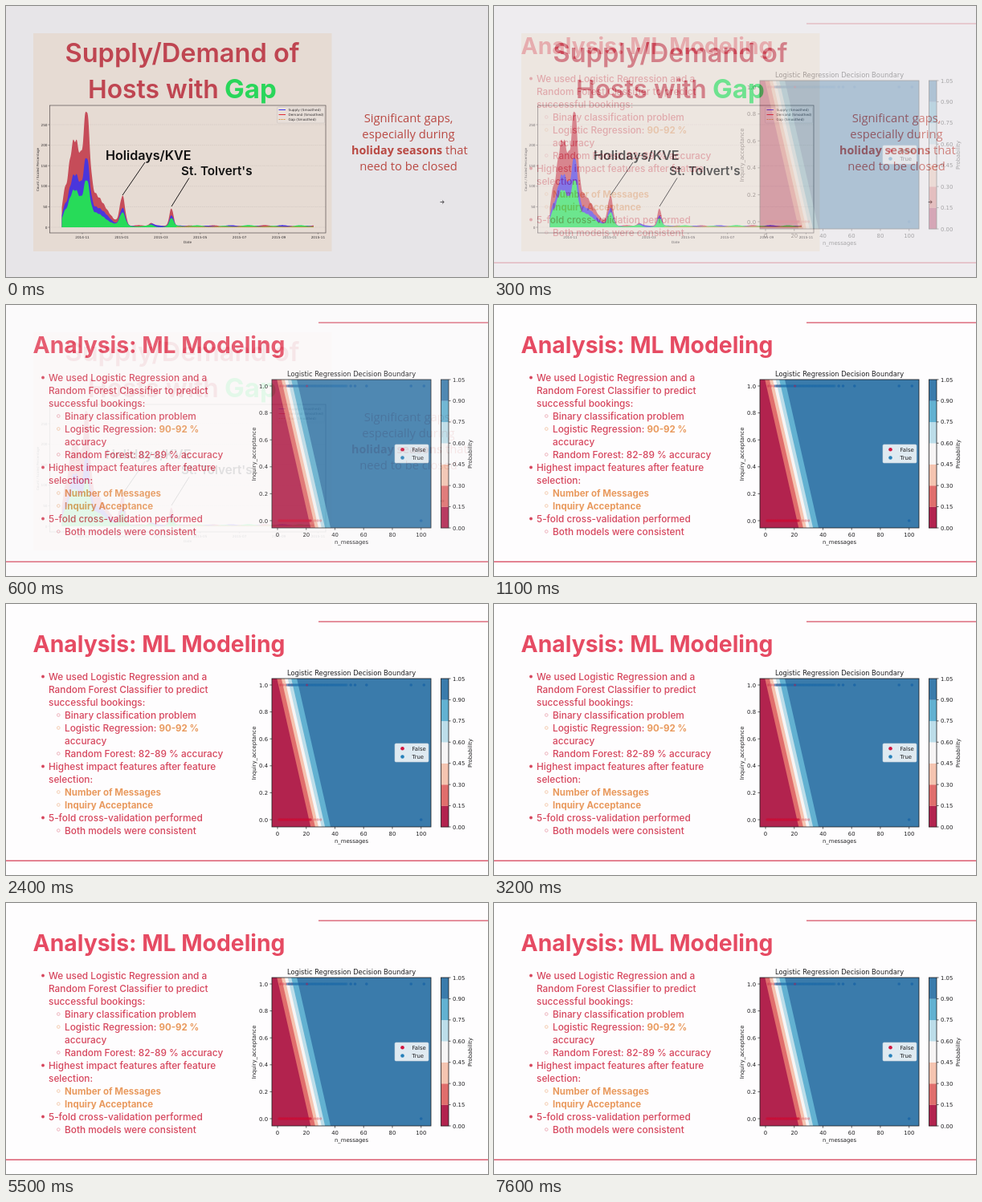
An HTML page with a canvas for the animation above (7700 ms loop, 600 by 338 pixels).

```html
<!DOCTYPE html>
<html lang="en">
<head>
<meta charset="utf-8">
<title>Slides</title>
<style>
  html, body { margin: 0; width: 100%; height: 100%; overflow: hidden; background: #fefdfe; }
  canvas { position: absolute; left: 0; top: 0; width: 600px; height: 338px; }
</style>
</head>
<body>
<canvas id="gap"></canvas>
<canvas id="model"></canvas>
<script>
const W = 600, H = 338, LOOP = 7700, STEP = 100, FADE = 780;
const UI = 'Inter, sans-serif', PLOT = '"DejaVu Sans", sans-serif', NOTE = '"Open Sans", sans-serif';
let c;

function open(id) {
  const el = document.getElementById(id), k = Math.max(1, window.devicePixelRatio || 1);
  el.width = W * k;
  el.height = H * k;
  c = el.getContext('2d');
  c.scale(k, k);
  return el;
}

function rect(x, y, w, h, fill) {
  c.fillStyle = fill;
  c.fillRect(x, y, w, h);
}

function frame(x, y, w, h, color, width) {
  c.strokeStyle = color;
  c.lineWidth = width;
  c.strokeRect(x, y, w, h);
}

function line(x1, y1, x2, y2, color, width = 1, dash = []) {
  c.strokeStyle = color;
  c.lineWidth = width;
  c.setLineDash(dash);
  c.beginPath();
  c.moveTo(x1, y1);
  c.lineTo(x2, y2);
  c.stroke();
  c.setLineDash([]);
}

function text(str, x, y, font, color, align = 'left') {
  c.font = font;
  c.fillStyle = color;
  c.textAlign = align;
  c.fillText(str, x, y);
  return c.measureText(str).width;
}

function upText(str, x, y, font, color) {
  c.save();
  c.translate(x, y);
  c.rotate(-Math.PI / 2);
  text(str, 0, 0, font, color, 'center');
  c.restore();
}

function dot(x, y, r, fill) {
  c.fillStyle = fill;
  c.beginPath();
  c.arc(x, y, r, 0, 7);
  c.fill();
}

function ring(x, y, r, color) {
  c.strokeStyle = color;
  c.lineWidth = 0.7;
  c.beginPath();
  c.arc(x, y, r, 0, 7);
  c.stroke();
}

function box(x, y, w, h, r, fill, stroke) {
  c.beginPath();
  c.roundRect(x, y, w, h, r);
  c.fillStyle = fill;
  c.fill();
  c.strokeStyle = stroke;
  c.lineWidth = 0.6;
  c.stroke();
}

const BASE = 276;
const bump = (x, at, height, width) => height * Math.exp(-((x - at) ** 2) / (2 * width * width));

// Autumn surge, its long decay, then two holiday peaks.
function demand(x) {
  const h = bump(x, 72, 14, 2) + bump(x, 85, 100, 8) + bump(x, 100.5, 98, 3.6) + bump(x, 110, 40, 14) +
    bump(x, 145, 37, 3.3) + bump(x, 181, 4.5, 3) + bump(x, 206, 23, 2.6);
  return h * (1 + 0.03 * Math.sin(x * 1.3));
}

function area(share, phase, fill) {
  c.fillStyle = fill;
  c.beginPath();
  c.moveTo(69.5, BASE);
  for (let x = 69.5; x <= 383; x += 0.5) {
    const ripple = 1.4 + 0.8 * Math.sin(x * 0.2 + phase) + 0.5 * Math.sin(x * 0.083 + phase * 2);
    c.lineTo(x, BASE - share * demand(x) - ripple);
  }
  c.lineTo(383, BASE);
  c.fill();
}

function drawGapSlide() {
  const ink = '#332f31', small = '4.2px ' + PLOT, rose = '#bf4551';
  rect(0, 0, W, H, '#e7e5e8');
  rect(34, 34, 371.5, 272, '#e6dbd3');
  text('Supply/Demand of', 219.5, 70, '600 32.6px ' + UI, rose, 'center');
  text('Hosts with', 102, 115, '600 31.8px ' + UI, rose);
  text('Gap', 272, 115, '700 33px ' + UI, '#29d65a');

  for (let i = 0; i < 6; i++) {
    const y = BASE - i * 25.6;
    line(54, y, 398, y, '#c8beb9', 0.5, [1.5, 1]);
    line(52.5, y, 54, y, ink, 0.5);
    text(i * 50, 51.5, y + 1.6, small, ink, 'right');
  }
  for (let i = 0; i < 7; i++) {
    const x = 95 + i * 48.9, month = (10 + 2 * i) % 12 + 1;
    line(x, 283, x, 284.5, ink, 0.5);
    text(`${i ? 2015 : 2014}-${String(month).padStart(2, '0')}`, x, 289.5, small, ink, 'center');
  }
  text('Date', 226, 295.5, small, ink, 'center');
  upText('Count / Scaled Percentage', 41, 204, '4.1px ' + PLOT, ink);

  area(1, 0, '#c64c59');
  area(0.6, 2, '#4a36dc');
  area(0.41, 4, '#27db59');
  line(212, BASE - 0.4, 383, BASE - 0.4, '#d9953f', 0.8);
  frame(54.5, 124, 343.5, 159, '#574f4f', 0.7);

  box(337.5, 126, 59, 20, 1, '#e8dfd9', '#cbc3bf');
  [['Supply', '#3b35ee'], ['Demand', '#e02c36'], ['Gap', '#d99a4b']].forEach(([name, color], i) => {
    const y = 129.5 + i * 6;
    line(339.5, y, 348, y, color, 1, i === 2 ? [2, 1] : []);
    text(name + ' (Smoothed)', 351.5, y + 1.6, small, ink);
  });

  line(173, 195, 145, 236, '#1c191a');
  line(228, 214.5, 206, 250, '#1c191a');
  text('Holidays/KVE', 124, 192, '600 16.1px ' + UI, '#111');
  text("St. Tolvert's", 218, 211, '600 15.2px ' + UI, '#111');

  const note = '14.75px ' + NOTE, red = '#b94943';
  text('Significant gaps,', 501, 145, note, red, 'center');
  text('especially during', 501, 165, note, red, 'center');
  const w = text('holiday seasons', 430, 185, 'bold 14.3px ' + NOTE, red);
  text(' that', 430 + w, 185, note, red);
  text('need to be closed', 501, 204.5, note, red, 'center');

  line(540.5, 244.5, 545, 244.5, '#39363a', 0.8);
  for (const side of [-2, 2]) line(543, 244.5 + side, 545.3, 244.5, '#39363a', 0.8);
}

// Indent sets the level, asterisks mark bold.
const list = `
• We used Logistic Regression and a
  Random Forest Classifier to predict
  successful bookings:
  ◦ Binary classification problem
  ◦ Logistic Regression: *90-92 %
    accuracy
  ◦ Random Forest: 82-89 % accuracy
• Highest impact features after feature
  selection:
  ◦ *Number of Messages
  ◦ *Inquiry Acceptance
• 5-fold cross-validation performed
  ◦ Both models were consistent`.trim().split('\n');

function drawList() {
  const red = '#d6465d', orange = '#e99a5e';
  list.forEach((row, i) => {
    const y = 90.5 + i * 16, x = /^ {4}|◦/.test(row) ? 73 : 53;
    const [plain, bold] = row.replace(/^[ •◦]+/, '').split('*');
    if (row.includes('•')) dot(46, y, 1.9, red);
    if (row.includes('◦')) ring(65.3, y, 1.8, bold ? '#efb78d' : '#e6929f');
    const w = text(plain, x, y + 4, '500 11.85px ' + UI, red);
    if (bold) text(bold, x + w, y + 4, '700 11.5px ' + UI, orange);
  });
}

const bands = ['#b2234e', '#e06e6c', '#f5c4b0', '#f7f5f5', '#bcdde9', '#62b1d1', '#3a7bab'];

function drawBoundary() {
  const L = 331, T = 93, R = 529, B = 278, ink = '#1d1d1f', font = '6.85px ' + PLOT;
  const px = n => 338 + n * 1.787, py = v => 269 - v * 168;
  text('Logistic Regression Decision Boundary', 430, 89, '8.3px ' + PLOT, ink, 'center');

  c.save();
  c.beginPath();
  c.rect(L, T, R - L, B - T);
  c.clip();
  // Band edges are the contours of a logistic model at steps of 0.15.
  bands.forEach((color, i) => {
    const p = i * 0.15, x = i ? 348.2 + 6.3 * Math.log(p / (1 - p)) : 0;
    c.fillStyle = color;
    c.beginPath();
    c.moveTo(x, T);
    c.lineTo(R, T);
    c.lineTo(R, B);
    c.lineTo(x + 42 * (i > 0), B);
    c.fill();
  });
  for (let n = 1; n < 24; n++) dot(px(n), py(0), 1.8, 'rgba(205,12,52,.6)');
  for (let n = 26; n < 31; n += 2) dot(px(n), py(0), 1.7, 'rgba(225,90,100,.45)');
  for (let n = 2; n < 12; n += 2) dot(px(n), py(1), 1.7, 'rgba(200,40,75,.4)');
  for (let n = 7; n < 49; n++) dot(px(n), py(1), 1.8, 'rgba(24,103,168,.5)');
  for (const n of [51, 54, 62, 93, 102]) dot(px(n), py(1), 1.8, '#1f68a6');
  dot(px(20.5), py(1), 1.6, 'rgba(150,45,95,.65)');
  dot(px(100), py(0), 1.8, '#1f68a6');
  c.restore();

  frame(L, T, R - L, B - T, ink, 0.8);
  for (let i = 0; i < 6; i++) {
    const x = px(i * 20), y = py(i / 5);
    line(x, B, x, B + 2.6, ink, 0.7);
    line(L - 2.6, y, L, y, ink, 0.7);
    text(i * 20, x, 289, font, ink, 'center');
    text((i / 5).toFixed(1), 326, y + 2.5, font, ink, 'right');
  }
  text('n_messages', 430, 297.5, font, ink, 'center');
  upText('Inquiry_acceptance', 311, 186, font, ink);

  const h = (B - T) / bands.length;
  bands.forEach((color, i) => rect(541.5, B - (i + 1) * h, 9.5, h + 0.2, color));
  frame(541.5, T, 9.5, B - T, ink, 0.8);
  for (let i = 0; i <= bands.length; i++) {
    const y = B - i * h;
    line(551, y, 553.6, y, ink, 0.7);
    text((i * 0.15).toFixed(2), 556, y + 2.5, font, ink);
  }
  upText('Probability', 579.5, 186, font, ink);

  box(484, 174, 42, 23, 1.5, 'rgba(255,255,255,.84)', '#c7d2da');
  [['False', '#d3153f'], ['True', '#2680ba']].forEach(([name, color], i) => {
    const y = 180.3 + i * 10.2;
    dot(493.5, y, 2.3, color);
    text(name, 505.5, y + 2.5, font, ink);
  });
}

function drawModelSlide() {
  rect(0, 0, W, H, '#fefdfe');
  line(389, 22, W, 22, '#dc6d7c', 1.3);
  line(0, 320.3, W, 320.3, '#dc5c70', 1.5);
  text('Analysis: ML Modeling', 33.5, 60, '700 28.3px ' + UI, '#e64b63');
  drawList();
  drawBoundary();
}

open('gap');
drawGapSlide();
const model = open('model');
drawModelSlide();

const start = performance.now();
function tick() {
  const now = (performance.now() - start) % LOOP;
  const p = Math.min(1, Math.floor(now / STEP) * STEP / FADE);
  model.style.opacity = (1 - Math.cos(Math.PI * p)) / 2;
  requestAnimationFrame(tick);
}
model.style.opacity = 0;
tick();
</script>
</body>
</html>
```
